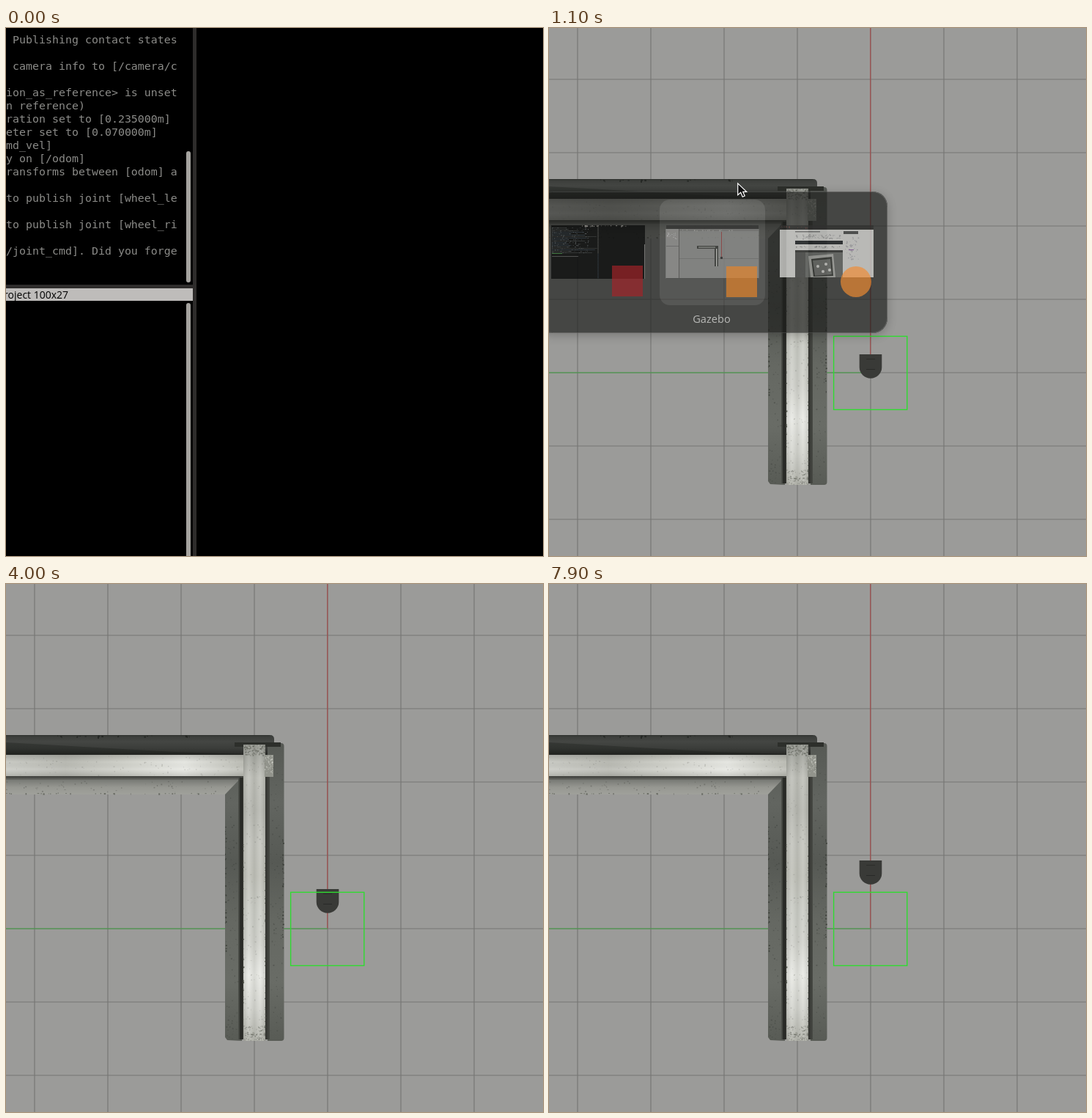
Write an HTML page with a canvas that moves like this. It is 733 px wide and 720 px high and loops after 8 s.

```html
<!DOCTYPE html>
<html lang="en">
<head>
<meta charset="utf-8">
<title>Robot drive</title>
<style>
  html, body { margin: 0; height: 100%; overflow: hidden; background: #000; }
  canvas { display: block; }
</style>
</head>
<body>
<canvas id="stage" width="733" height="720"></canvas>
<script>
const W = 733, H = 720, LOOP = 8000, STEP = 100;
const OUTPUT_AT = 300, SWITCHER_AT = 800, SIMULATOR_AT = 1100, SWITCHER_GONE = 1200;
const stage = document.getElementById('stage').getContext('2d');

function layer(draw) {
  const canvas = document.createElement('canvas');
  canvas.width = W;
  canvas.height = H;
  draw(canvas.getContext('2d'));
  return canvas;
}

function box(c, x, y, w, h, color, radius = 0) {
  c.fillStyle = color;
  c.beginPath();
  c.roundRect(x, y, w, h, radius);
  c.fill();
}

function shape(c, color, ...points) {
  c.fillStyle = color;
  c.beginPath();
  points.forEach(([x, y]) => c.lineTo(x, y));
  c.closePath();
  c.fill();
}

function line(c, color, x1, y1, x2, y2, width = 1) {
  c.strokeStyle = color;
  c.lineWidth = width;
  c.beginPath();
  c.moveTo(x1, y1);
  c.lineTo(x2, y2);
  c.stroke();
}

function label(c, text, x, y, color, font, align = 'left') {
  c.fillStyle = color;
  c.font = font;
  c.textAlign = align;
  c.fillText(text, x, y);
}

function gradient(c, x1, y1, x2, y2, ...colors) {
  const g = c.createLinearGradient(x1, y1, x2, y2);
  colors.forEach((color, i) => g.addColorStop(i / (colors.length - 1), color));
  return g;
}

function randomizer(seed) {
  return () => (seed = (seed * 16807) % 2147483647) / 2147483647;
}

// Scattered translucent specks for concrete and tiny text.
function specks(c, seed, count, x, y, w, h, color, size = 1.5) {
  const random = randomizer(seed);
  c.fillStyle = color;
  for (let i = 0; i < count; i++) {
    c.fillRect(x + random() * w, y + random() * h, 0.5 + random() * size, 0.5 + random() * size);
  }
}

const MONO = '14.95px "DejaVu Sans Mono", monospace';
const SANS = '"Open Sans", "Noto Sans", sans-serif';
const TEXT = '#8b8b88';
const log = [
  ' Publishing contact states', '', ' camera info to [/camera/c', '',
  'ion_as_reference> is unset', 'n reference)', 'ration set to [0.235000m]',
  'eter set to [0.070000m]', 'md_vel]', 'y on [/odom]',
  'ransforms between [odom] a', '', 'to publish joint [wheel_le', '',
  'to publish joint [wheel_ri', '', '/joint_cmd]. Did you forge'
];

const terminal = layer(c => {
  box(c, 0, 0, W, H, '#000');
  log.forEach((text, row) => label(c, text, 0, 21 + row * 18, TEXT, MONO));
  box(c, 255, 0, 5, H, '#2e2c2b');
  box(c, 0, 350, 256, 5, '#2e2c2b');
  box(c, 0, 355, 255, 17, '#bebcba');
  label(c, 'project 100x27', 85, 369, '#000', '14px ' + SANS, 'right');
  box(c, 246, 168, 6, 179, '#a5a39f', 3);
  box(c, 246, 375, 6, 360, '#a5a39f', 3);
});

const output = layer(c => {
  for (let y = 3; y < H + 18; y += 18) label(c, '0.0', 261, y, TEXT, MONO);
});

function drawHorizontalWall(c) {
  box(c, 0, 206, 366, 27, gradient(c, 0, 206, 0, 233, '#3a3c39', '#444643', '#3b3d3a', '#272825'), [0, 5, 0, 0]);
  shape(c, 'rgba(15,16,14,.25)', [0, 216], [230, 229], [325, 232], [0, 232]);
  box(c, 0, 206, 360, 1.3, '#2f312e');
  box(c, 0, 233, 325, 29, gradient(c, 0, 0, 325, 0, '#c9cac4', '#b9bab3', '#d0d1ca', '#e6e7e2', '#bcbdb5'));
  box(c, 0, 233, 325, 29, gradient(c, 0, 233, 0, 262, 'rgba(40,42,36,.2)', 'rgba(40,42,36,0)', 'rgba(255,255,255,.1)', 'rgba(40,42,36,.15)'));
  box(c, 0, 262, 325, 5, gradient(c, 0, 262, 0, 267, '#3a3b37', '#696a65'));
  shape(c, gradient(c, 0, 267, 0, 287, '#777974', '#969791', '#a0a19b'), [0, 267], [320, 267], [299, 287], [0, 287]);
  specks(c, 31, 90, 0, 234, 323, 27, 'rgba(90,92,84,.2)');
  specks(c, 5, 50, 0, 268, 300, 18, 'rgba(50,52,47,.3)');
  specks(c, 77, 20, 70, 206, 180, 2, '#252724', 2.5);
  specks(c, 92, 30, 0, 285, 298, 0.5, '#6a6c65', 2);
}

function drawVerticalWall(c) {
  const shade = gradient(c, 0, 217, 0, 623, '#565954', '#626560', '#565954', '#656862', '#696c66', '#585b55');
  shape(c, shade, [299, 287], [322, 263], [322, 623], [302, 622], [299, 618]);
  box(c, 357, 217, 22.5, 406, shade, [0, 4, 4, 0]);
  box(c, 317, 264, 7, 357, gradient(c, 317, 0, 324, 0, '#535650', '#252623', '#33342f'));
  box(c, 354, 235, 6, 386, gradient(c, 354, 0, 360, 0, '#32332f', '#474944'));
  box(c, 312, 216, 63, 6, '#2d2f2b');
  box(c, 324, 219, 30, 404, gradient(c, 0, 219, 0, 623, '#999b94', '#c0c1ba', '#b8b9b2', '#c5c6bf', '#c1c2ba', '#cccec7', '#d2d3cd', '#e9eae5', '#d6d7d1', '#b6b7af'));
  box(c, 324, 219, 30, 404, gradient(c, 324, 0, 354, 0, 'rgba(40,42,35,.15)', 'rgba(255,255,255,.08)', 'rgba(60,62,55,.1)', 'rgba(255,255,255,.08)', 'rgba(40,42,35,.15)'));
  box(c, 353, 233, 12, 30, '#92948c');
  specks(c, 17, 110, 325, 219, 28, 14, 'rgba(55,58,50,.35)');
  specks(c, 22, 95, 325, 602, 28, 20, 'rgba(65,68,58,.35)');
  specks(c, 41, 120, 325, 236, 28, 365, 'rgba(80,83,74,.2)');
  specks(c, 43, 40, 353, 234, 11, 28, 'rgba(230,231,224,.5)');
  specks(c, 47, 70, 300, 290, 16, 330, 'rgba(35,37,32,.25)');
  specks(c, 53, 70, 361, 222, 16, 398, 'rgba(35,37,32,.25)');
  for (const x of [299, 377]) specks(c, 60 + x, 30, x, 330, 1, 170, '#3c3f39');
  for (const x of [323.5, 353]) specks(c, 70 + x, 40, x, 350, 0.5, 265, '#585b52', 1);
}

const world = layer(c => {
  box(c, 0, 0, W, H, '#9b9b99');
  for (let x = 39; x < W; x += 100) line(c, '#777775', x, 0, x, H, 1.2);
  for (let y = 70; y < H; y += 100) line(c, '#777775', 0, y, W, y, 1.2);
  line(c, '#a54444', 438.8, 0, 438.8, 470);
  line(c, '#42a044', 0, 470, 439, 470);
  drawHorizontalWall(c);
  drawVerticalWall(c);
});

function drawTerminalThumb(c) {
  box(c, 3, 269, 128, 73, '#050606');
  specks(c, 8, 20, 45, 269, 60, 1, '#a9a6a0', 2);
  const random = randomizer(12);
  for (let y = 272; y < 307; y += 2) {
    box(c, 4, y, 20 + random() * 42, 1, random() < 0.4 ? '#25303a' : '#2c2f2f');
    specks(c, y, 9, 4, y, 50, 0.5, '#70777a', 0.7);
  }
  box(c, 4, 307, 14, 1, '#358535');
  box(c, 4, 311, 36, 1, '#555');
  for (let y = 272; y < 342; y += 2) box(c, 66.5, y, 1, 1, y < 308 ? '#9a9996' : '#465c70');
  box(c, 130, 295, 1, 47, '#8c8b88');
}

function drawSimulatorThumb(c) {
  box(c, 159.5, 269, 127, 73, '#969795');
  box(c, 159.5, 269, 127, 5, '#30302f');
  box(c, 178, 274, 108, 3, '#858583');
  specks(c, 18, 15, 182, 275, 70, 1, '#c5c5c2', 1);
  box(c, 159.5, 274, 18, 67, '#a09f9d');
  specks(c, 19, 18, 161, 279, 12, 9, '#ddd', 1);
  box(c, 160, 297, 17, 1, '#777');
  box(c, 177, 274, 1, 67, '#5c5c5a');
  line(c, '#a54444', 235.5, 278, 235.5, 314);
  line(c, '#818280', 178, 314.5, 286, 314.5);
  box(c, 202, 297, 29, 4, '#393b38');
  box(c, 204, 298.5, 23, 1, '#c9cac5');
  box(c, 226, 300, 5, 25, '#393b38');
  box(c, 228, 301, 1.4, 24, '#d8d9d4');
  box(c, 234, 312, 3, 3, '#333');
  box(c, 159.5, 341, 127, 1, '#50504e');
}

function drawBrowserThumb(c) {
  box(c, 315, 269, 128, 71, '#f2f2ef');
  box(c, 315, 269, 128, 6, '#30302f');
  specks(c, 24, 12, 317, 270, 35, 3, '#855049', 1);
  box(c, 336, 277, 34, 1.5, '#888');
  specks(c, 25, 60, 337, 281, 60, 6, '#bbb', 1.5);
  box(c, 336, 290, 65, 5, '#25292d');
  specks(c, 26, 25, 337, 297, 60, 2, '#aaa', 1.5);
  box(c, 402, 277, 20, 4, '#555');
  specks(c, 27, 45, 404, 284, 18, 31, '#c3c2c5', 1.5);
  box(c, 409, 302, 7, 1, '#9a62b4');
  box(c, 336, 303, 65, 37, '#747673');
  box(c, 336, 303, 65, 3, '#3b3c3a');
  box(c, 336, 306, 14, 34, '#565755');
  shape(c, '#bfc0bb', [354, 311], [388, 308], [391, 340], [357, 340]);
  shape(c, '#3a3c38', [358, 315], [386, 312], [388, 338], [361, 339]);
  shape(c, '#777975', [360, 317], [384, 315], [386, 336], [363, 338]);
  [[365, 323], [376, 320], [372, 330], [381, 328]].forEach(([x, y]) => box(c, x, y, 4, 4, '#f0f0eb', 2));
}

const panel = layer(c => {
  c.shadowColor = 'rgba(0,0,0,.35)';
  c.shadowBlur = 14;
  c.shadowOffsetY = 3;
  box(c, -16, 223, 478, 193, '#1c1d1b', 20);
  c.shadowColor = 'transparent';
  c.strokeStyle = '#454644';
  c.lineWidth = 1;
  c.beginPath();
  c.roundRect(-15.5, 223.5, 477, 192, 20);
  c.stroke();
  box(c, 151, 234, 144, 144, '#353634', 14);
});

const thumbs = layer(c => {
  drawTerminalThumb(c);
  drawSimulatorThumb(c);
  drawBrowserThumb(c);
  label(c, 'Gazebo', 222, 402, '#f1f1ef', '14.6px ' + SANS, 'center');
});

const icons = layer(c => {
  box(c, 86, 324, 42, 42, '#a52328');
  box(c, 242, 325, 42, 42, '#e98427');
  box(c, 398, 325, 42, 42, '#f28c32', 21);
});

function drawRobot(c, top) {
  c.fillStyle = '#393a37';
  c.beginPath();
  c.moveTo(423.7, top);
  c.lineTo(454.3, top);
  c.lineTo(454.3, top + 17.5);
  c.arc(439, top + 17.5, 15.3, 0, Math.PI);
  c.fill();
  line(c, '#292a28', 433, top + 6.5, 445, top + 6.5, 0.8);
  line(c, '#292a28', 433, top + 20.5, 445, top + 20.5);
}

function drawCursor(c, x, y) {
  c.save();
  c.translate(x, y);
  c.beginPath();
  [[0, 0], [0, 16], [4, 12.5], [6.5, 18.5], [9.5, 17.2], [7, 11.5], [12, 11.5]].forEach(p => c.lineTo(...p));
  c.closePath();
  c.fillStyle = '#111';
  c.fill();
  c.strokeStyle = '#fff';
  c.lineWidth = 1.2;
  c.stroke();
  c.restore();
}

function render(time) {
  const inSimulator = time >= SIMULATOR_AT;
  if (inSimulator) {
    stage.drawImage(world, 0, 0);
    drawRobot(stage, Math.round(456.2 - time / 100));
    stage.strokeStyle = '#2fdb30';
    stage.lineWidth = 1.4;
    stage.strokeRect(388.6, 420.4, 100.2, 100);
  } else {
    stage.drawImage(terminal, 0, 0);
    if (time >= OUTPUT_AT) stage.drawImage(output, 0, 0);
  }
  if (time >= SWITCHER_AT && time < SWITCHER_GONE) {
    // Each part fades by itself, so stacked parts stay denser.
    stage.globalAlpha = inSimulator ? 0.67 : 1;
    [panel, thumbs, icons].forEach(part => stage.drawImage(part, 0, 0));
    stage.globalAlpha = 1;
  }
  if (time >= SWITCHER_AT) {
    const glide = Math.max(0, (time - SIMULATOR_AT) / 300);
    const x = 257.7 + 441 * glide ** 2;
    if (x < W) drawCursor(stage, x, 211.8);
  }
}

function frame() {
  const time = performance.now() % LOOP;
  render(Math.floor(time / STEP) * STEP);
  requestAnimationFrame(frame);
}
frame();
</script>
</body>
</html>
```
